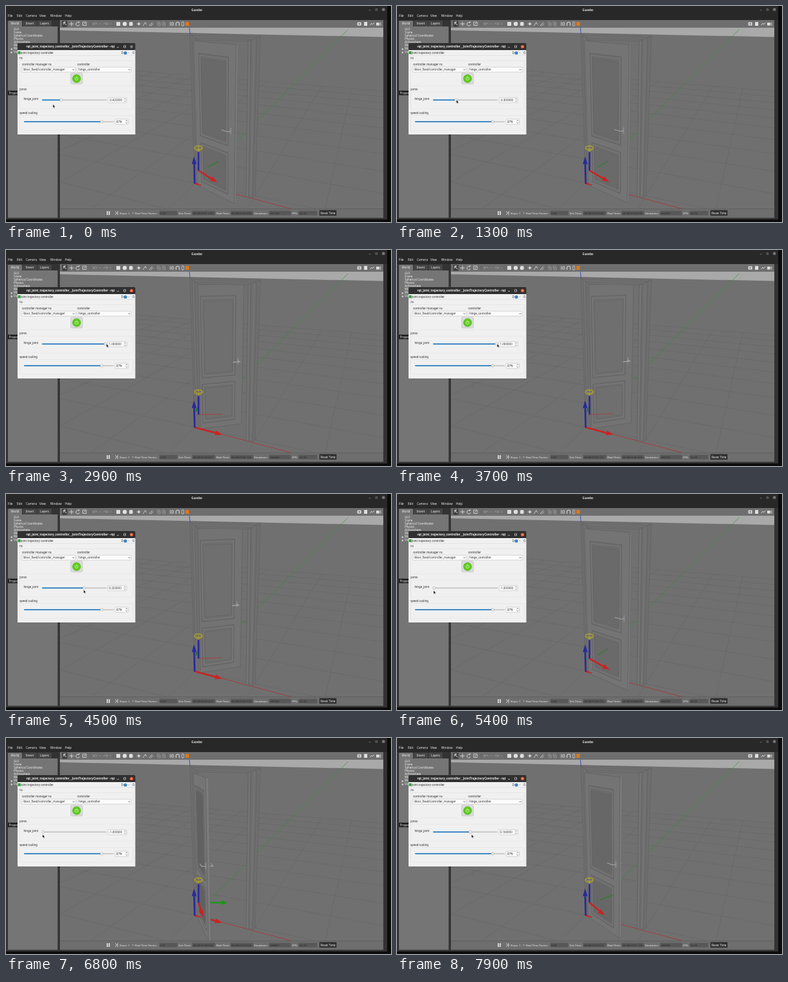
Recreate the animation shown at these times as an HTML page. Size 600x338 px, loop 8000 ms.

```html
<!DOCTYPE html>
<html>
<head>
<meta charset="utf-8">
<style>
html, body { margin: 0; width: 100%; height: 100%; overflow: hidden; background: #0c0c0c; }
svg { display: block; width: 600px; height: 338px; font-family: "Noto Sans", sans-serif; }
text { white-space: pre; }
</style>
</head>
<body>
<svg id="stage" viewBox="0 0 600 338"></svg>
<script>
const LOOP = 8000, STEP = 100, FOCUS = 1000;

// Markup helpers
const rect = (x, y, w, h, fill, more = '') =>
  `<rect x="${x}" y="${y}" width="${w}" height="${h}" fill="${fill}" ${more}/>`;
const text = (x, y, s, fill = '#2a2a2a', size = 4.4, more = '') =>
  `<text x="${x}" y="${y}" fill="${fill}" font-size="${size}" ${more}>${s}</text>`;
const path = (d, stroke, w = 1, more = '') =>
  `<path d="${d}" fill="none" stroke="${stroke}" stroke-width="${w}" ${more}/>`;
const circle = (x, y, r, fill, more = '') =>
  `<circle cx="${x}" cy="${y}" r="${r}" fill="${fill}" ${more}/>`;
const toPath = pts => 'M' + pts.map(p => p[0].toFixed(2) + ' ' + p[1].toFixed(2)).join('L');
const poly = (pts, fill, stroke = 'none', w = 0.7) =>
  `<path d="${toPath(pts)}Z" fill="${fill}" stroke="${stroke}" stroke-width="${w}"/>`;

// Perspective: x along the doorway, y away from the viewer, z up
const depth = (x, y, z = 0) => 1 - 0.0679 * x + 0.13 * y - 0.1326 * z;
function project(x, y, z) {
  const w = depth(x, y, z);
  return [(294 + 67.65 * x + 73.7 * y - 45.06 * z) / w,
          (277 - 0.16 * x + 0.31 * y - 239.27 * z) / w];
}

function floorLine(a, b) {
  let wa = depth(...a), wb = depth(...b);
  const near = 0.12;
  if (wa < near && wb < near) return '';
  if (wa > wb) { [a, b] = [b, a]; [wa, wb] = [wb, wa]; }
  if (wa < near) {
    const k = (near - wa) / (wb - wa);
    a = [a[0] + (b[0] - a[0]) * k, a[1] + (b[1] - a[1]) * k];
  }
  return toPath([project(...a, 0), project(...b, 0)]);
}

function arrow([x1, y1], [x2, y2], color, w = 2.6, head = 11) {
  const len = Math.hypot(x2 - x1, y2 - y1) || 1;
  const dx = (x2 - x1) / len, dy = (y2 - y1) / len;
  head = Math.min(head, len * 0.6);
  const bx = x2 - dx * head, by = y2 - dy * head, h = 3.7;
  return path(toPath([[x1, y1], [bx, by]]), color, w) +
    poly([[bx - dy * h, by + dx * h], [x2, y2], [bx + dy * h, by - dx * h]], color);
}

// Linear keyframes: [time, value]
function track(keys, t) {
  let i = 1;
  while (i < keys.length - 1 && t > keys[i][0]) i++;
  const [t0, a] = keys[i - 1], [t1, b] = keys[i];
  return a + (b - a) * Math.max(0, Math.min(1, (t - t0) / (t1 - t0)));
}
const SLIDER = [[0, -.42], [1200, -.42], [2100, .66], [2600, 1], [3950, 1], [4500, .32],
  [4800, -.36], [5300, -1], [7200, -1], [7500, -.48], [7900, .16]];
const ANGLE = [[0, 25], [1000, 25], [1400, 21], [1800, 14], [2100, 7], [2500, -18], [2900, -43],
  [3050, -46], [4500, -46], [4800, -34], [5100, -4], [5400, 21], [5900, 43], [6300, 53],
  [6600, 57], [7250, 57], [7600, 47], [7900, 34]];
const CURSOR_DX = [[0, -13], [900, 0], [2100, 2], [4000, 1], [4500, -1], [5300, -1], [7200, -1], [7900, 2]];
const CURSOR_Y = [[0, 154], [900, 147], [3900, 147], [4500, 150], [5300, 151], [7900, 151]];

function backdrop() {
  let grid = '';
  for (let k = -10; k <= 10; k++) grid += floorLine([k, -10], [k, 10]) + floorLine([-10, k], [10, k]);
  return rect(84, 34, 504, 284, '#707070') +
    poly([[84, 34], [588, 34], [588, 48.5], [84, 38]], '#a9a9a9') +
    path(grid, '#656565', 0.6) +
    path('M294 278L533 37', '#35953a', 0.7) +
    path('M294 277L447 318', '#b03030', 0.8) +
    path('M285.8 34L287 46', '#2b3fc4', 0.9);
}

function frame() {
  const edge = '#626262';
  return poly([[286.5, 43], [299, 53], [303, 276], [300, 279], [294, 278]], '#6e6e6e', edge) +
    path('M290 47L296.5 276M294 49L299 277', '#646464', 0.8) +
    path('M292 48L298 277', '#7b7b7b', 0.7) +
    poly([[396.5, 47], [377, 55], [374, 297], [378, 300], [388, 297]], '#6e6e6e', edge) +
    path('M391 50L384.5 297M382 53L378.5 299', '#636363', 0.8) +
    path('M387 51L381.5 298M379.5 54L376 298', '#7d7d7d', 0.8) +
    poly([[286.5, 43], [396.5, 47], [377, 55], [299, 53]], '#707070', edge) +
    path('M290 46L391 49.5M295 50L384 52.5', '#646464', 0.7);
}

function door(deg) {
  const a = deg * Math.PI / 180, c = Math.cos(a), s = Math.sin(a);
  const at = (r, n, z) => project(.05 + r * c + n * s, -r * s + n * c, z);
  const quad = (r0, r1, z0, z1) => [at(r0, 0, z0), at(r1, 0, z0), at(r1, 0, z1), at(r0, 0, z1)];
  const open = Math.max(0, deg);
  const tone = v => { const g = Math.round(v); return `rgb(${g},${g},${g})`; };
  const panel = (z0, z1) =>
    poly(quad(.1, .67, z0, z1), tone(110 - open * .1), '#606060', 0.8) +
    poly(quad(.12, .65, z0 + .012, z1 - .012), 'none', '#828282', 0.7) +
    poly(quad(.15, .62, z0 + .03, z1 - .03), tone(111 - open * .25), '#646464', 0.7);
  const lever = (n0, n1) => path(toPath([at(.72, n0, .46), at(.72, n1, .46), at(.6, n1, .46)]), '#a8a8a8', 1.1);
  const bottom = -.012, top = .96, side = .8;

  const leaf = lever(.035, .1) +
    poly([at(side, 0, bottom), at(side, .035, bottom), at(side, .035, top), at(side, 0, top)], '#7c7c7c', '#666', 0.5) +
    poly(quad(0, side, bottom, top), tone(115 + open * .04), '#606060', 0.7) +
    panel(.03, .316) + panel(.36, .89) +
    path(toPath([at(.72, 0, .44), at(.72, 0, .48)]), '#929292', 1.4) + lever(0, -.06);

  const base = [300, 257.5];
  const red = project(.05 + .45 * c, -.45 * s, .08);
  const green = project(.05 + .5 * s, .5 * c, .09);
  const worldRed = arrow([294, 277.5], [337, 289], '#cc2222');
  const clear = deg > 45;
  let out = '';
  if (deg >= 0) {
    out = frame() + worldRed + (clear ? arrow(base, green, '#149a14', 2.2, 9) : '') + leaf;
    if (deg < 14) out += path('M294 277.5L331 288.5', '#cc2222', 1.5);
    if (!clear) {
      const mid = [base[0] + (green[0] - base[0]) * .45, base[1] + (green[1] - base[1]) * .45 - 1];
      out += path(toPath([mid, [green[0], green[1] - 5]]), '#2a7f2a', deg > 14 ? 1.8 : .8, 'stroke-dasharray="1.6 .7"');
    }
    out += path('M294 277.5L304 280.5', '#cc2222', 1.4) + arrow(base, red, '#cc2222');
  } else {
    out = leaf + frame() +
      path(toPath([base, red]), '#a04444', 1.3, 'opacity=".8"') +
      path('M296 253L299 246', '#1c7c1c', 2) + worldRed;
  }
  return out + path('M300 257.5V228', '#28289c', 2.6) +
    arrow([294, 278], [293, 235.5], '#28289c', 2.6, 12) +
    `<ellipse cx="299.8" cy="222.3" rx="6.2" ry="3.4" fill="none" stroke="#b9ad1e" stroke-width="1.2"/>` +
    path('M295 222L300 225L305 222M300 219V229', '#b9ad1e', 0.8);
}

function toolbar() {
  const ink = '#dedede', dim = '#969696';
  let s = rect(84, 22, 504, 12, '#6e6e6e') + rect(87.5, 23, 8, 9.5, '#3c3c3c') +
    path('M90 25L94 30M90 25V29M90 25H93.5', '#eee', 1) +
    path('M102 24.5V31.5M98.5 28H105.5', ink, 0.9) +
    path('M113.5 26A2.8 2.8 0 1 0 114.5 29M112 26H114V24', ink, 0.9) +
    path('M119.5 25H125V30.5H119.5ZM121 29L124 26', ink, 0.8) +
    path('M136 29A3 2.5 0 0 1 142 29M136 26V29H139', dim, 0.9) +
    path('M152 29A3 2.5 0 0 1 158 29M158 26V29H155', dim, 0.9) +
    path('M145.5 27L146.8 28.5L148 27M161.5 27L162.8 28.5L164 27', dim, 0.7) +
    rect(172, 25, 6, 6, ink) + circle(185, 28, 3.2, ink) + rect(192, 25, 5.5, 6, ink, 'rx="1.6"') +
    circle(207, 28, 1.7, ink) + path('M207 24.8V31.2M203.8 28H210.2', ink, 0.6) +
    path('M213.5 31L217 25.5L219 29M223 31L228 25.5M225.5 31.5L229 27.5', ink, 0.8);
  for (const x of [238, 246]) s += path(`M${x - 2.5} 25H${x + 1}V29H${x - 2.5}ZM${x - 1} 27H${x + 2.5}V31H${x - 1}Z`, dim, 0.7);
  s += path('M256 25V31M258 26H261V30H258Z', ink, 0.8) + path('M265 31V27A2.6 2.4 0 0 1 270 27V31', ink, 1.1) +
    path('M274 25H277V31H274Z', ink, 0.7) + rect(279.5, 25, 5.5, 6, '#e07818');
  for (const x of [131, 167, 201, 233, 251]) s += path(`M${x} 24V32`, '#5c5c5c', 0.6);
  return s + rect(547.5, 25.5, 6, 5, ink) + circle(550.5, 28, 1.2, '#6e6e6e') +
    rect(558, 25, 5, 6, ink) + path('M567.5 30L570 27L571.5 29L574 26', ink, 0.9) +
    rect(577, 26, 4.5, 4.5, ink) + path('M581 28.2L584 26V30.5Z', ink, 0.7);
}

function chrome() {
  let s = rect(0, 0, 600, 338, '#0c0c0c') + rect(0, 11, 594, 323, '#333') + rect(0, 0, 594, 22, '#282828') +
    text(297.5, 7.8, 'Gazebo', '#dcdcdc', 4.6, 'font-weight="700" text-anchor="middle"') +
    path('M565.5 6.5H568.5M576 4.5H578.5V7H576Z', '#999', 0.6) +
    circle(588.2, 5.5, 2.7, '#565656') + path('M587.1 4.4L589.3 6.6M587.1 6.6L589.3 4.4', '#ddd', 0.6);
  [[3, 'File'], [17, 'Edit'], [31, 'Camera'], [52, 'View'], [69, 'Window'], [92, 'Help']]
    .forEach(([x, w]) => s += text(x, 17.3, w, '#eee', 4.7));
  s += rect(3, 32, 77.5, 299.5, '#757575');
  [[3, 'World'], [26, 'Insert'], [49, 'Layers']].forEach(([x, w], i) =>
    s += rect(x, 23, 22, 9, i ? '#454545' : '#757575', 'rx="1"') +
      text(x + 11, 29.2, w, '#f0f0f0', 4.6, 'text-anchor="middle"'));
  ['GUI', 'Scene', 'Spherical Coordinates', 'Physics', 'Atmosphere', 'Wind', 'Models', 'Lights']
    .forEach((w, i) => s += text(12, 37.6 + i * 5.1, w, '#f2f2f2', 4.4));
  return s + path('M8 66.5L10 67.6L8 68.7ZM8 71.6L10 72.7L8 73.8Z', '#eee', 0.8) +
    rect(3, 132.5, 77.5, 7, '#1c1c1c') + text(4.5, 137.8, 'Property', '#eee', 4.4) + toolbar();
}

function statusBar() {
  let s = rect(84, 317.5, 504, 14, '#6e6e6e') +
    rect(157, 321, 1.6, 6, '#eee') + rect(160, 321, 1.6, 6, '#eee') +
    path('M170 321.5L173 324L170 326.5M174 321V327', '#ddd', 0.9);
  [[177, 'Steps: 1'], [201, 'Real Time Factor:'], [269, 'Sim Time:'], [328, 'Real Time:'],
   [387, 'Iterations:'], [446, 'FPS:']].forEach(([x, w]) => s += text(x, 325.6, w, '#ececec', 4.3));
  s += path('M196.5 323.3L197.7 324.8L199 323.3', '#ddd', 0.6);
  [[239, 28], [290, 36], [350, 35], [410, 34], [456, 29]]
    .forEach(([x, w]) => s += rect(x, 320.5, w, 7, '#585858', 'rx="1"'));
  return s + rect(488, 319, 27.5, 9.5, '#303030', 'rx="1" stroke="#808080" stroke-width=".5"') +
    text(501.8, 325.6, 'Reset Time', '#eee', 4.5, 'text-anchor="middle"');
}

function spin(x, y, w) {
  return rect(x, y, w, 8, '#fff', 'stroke="#b5b5b5" stroke-width=".6" rx="1"') +
    path(`M${x + w - 4} ${y + 3}l1.3 -1.4l1.3 1.4M${x + w - 4} ${y + 5}l1.3 1.4l1.3 -1.4`, '#444', 0.7);
}
const slider = (x0, x1, y, x) =>
  rect(x0, y - .8, x1 - x0, 1.7, '#c6c6c6', 'rx=".8"') + rect(x0, y - .8, Math.max(0, x - x0), 1.7, '#2b80c2', 'rx=".8"') +
  circle(x, y, 2.1, '#fafafa', 'stroke="#9a9a9a" stroke-width=".6"');

function dialog() {
  const combo = (x, w, s) => rect(x, 95.8, w, 7.6, '#fcfcfc', 'stroke="#bdbdbd" stroke-width=".6" rx="1"') +
    text(x + 2, 101.2, s) + path(`M${x + w - 4.5} 98.8l1.5 1.6l1.5 -1.6`, '#444', 0.7);
  return rect(18, 58, 183.5, 14, '#303030', 'rx="2"') + rect(18, 69, 183.5, 132, '#f0f0f0') +
    text(100.5, 65.2, 'rqt_joint_trajectory_controller__JointTrajectoryController - rqt', '#f2f2f2', 4.5, 'font-weight="700" text-anchor="middle"') +
    path('M173 64.5H176M183.5 62H186.5V65H183.5Z', '#ddd', 0.7) +
    rect(18.5, 70.8, 4, 4.5, '#2f9e3a') + text(22.8, 75.4, 'Joint trajectory controller') +
    text(179.5, 75.2, 'D', '#333', 4.6) + circle(186, 73.5, 2.6, '#3b86c8') +
    text(190.8, 75.2, '-', '#333', 4.6) + text(197, 75.2, 'O', '#333', 4.4) +
    path('M18.5 77.5H200.5', '#d6d6d6', 0.5) +
    text(21, 83.3, 'ns') + path('M21 85.5H198V125H21ZM21 135H198V161H21ZM21 171.5H198V194H21Z', '#dddddd', 0.5) +
    text(25, 93, 'controller manager ns') + text(111, 93, 'controller') +
    combo(24, 84, '/door_fixed/controller_manager') + combo(111, 84, 'hinge_controller') +
    rect(101, 105, 18, 17, '#dcdcdc', 'stroke="#b4b4b4" stroke-width=".6" rx="1.5"') +
    circle(110, 113.6, 6.4, '#5fcb20', 'stroke="#5ab02c" stroke-width=".6"') +
    circle(110, 113.8, 2.3, 'none', 'stroke="#c8f5a8" stroke-width=".9"') +
    path('M110 110.8V113.4', '#c8f5a8', 0.9) +
    text(21, 132.2, 'joints') + text(27.5, 147, 'hinge_joint') + spin(159, 143.3, 29) +
    text(21, 169, 'speed scaling') + slider(28, 168, 181, 149) + spin(170, 177.2, 20.5) + text(172, 182.8, '87%');
}

const stage = document.getElementById('stage');
stage.innerHTML = '<clipPath id="view"><rect x="84" y="34" width="504" height="283.5"/></clipPath>' +
  chrome() + `<g clip-path="url(#view)">${backdrop()}<g id="door"></g></g>` +
  statusBar() + '<g id="counts"></g>' + dialog() + '<g id="control"></g>';
const doorLayer = document.getElementById('door');
const counts = document.getElementById('counts');
const control = document.getElementById('control');

function clock(sec) {
  const m = Math.floor(sec / 60);
  return `00 00:${String(m).padStart(2, '0')}:${(sec % 60).toFixed(3).padStart(6, '0')}`;
}

function draw(t) {
  doorLayer.innerHTML = door(track(ANGLE, t));

  const value = Math.round(track(SLIDER, t) * 50) / 50, x = 106.5 + 48.5 * value;
  const cx = x + track(CURSOR_DX, t), cy = track(CURSOR_Y, t);
  control.innerHTML = slider(56, 157, 147, x) + text(160.5, 149, value.toFixed(6), '#2a2a2a', 4.5) +
    circle(195.6, 63.6, 2.7, t < FOCUS ? '#5a5a5a' : '#e2562a') +
    path('M194.6 62.6L196.6 64.6M196.6 62.6L194.6 64.6', '#fff', 0.6) +
    `<path transform="translate(${cx} ${cy})" d="M0 0V5.2L1.2 4.1L2 5.9L2.8 5.5L2 3.8H3.6Z" fill="#111" stroke="#fff" stroke-width=".3"/>`;

  const wave = Math.sin(t / 700);
  counts.innerHTML = [[240.5, (.92 + .04 * wave).toFixed(2)], [291.5, clock(421.73 + t * .00093)],
    [351.5, clock(463.224 + t * .001)], [411.5, Math.round(431743 + t * .93)],
    [457.5, (62.3 + .25 * wave).toFixed(2)]]
    .map(([px, s]) => text(px, 325.5, s, '#222', 4.2)).join('');
}

let shown = -1;
function tick(now) {
  const t = Math.floor((now % LOOP) / STEP) * STEP;
  if (t !== shown) draw(shown = t);
  requestAnimationFrame(tick);
}
draw(0);
requestAnimationFrame(tick);
</script>
</body>
</html>
```
